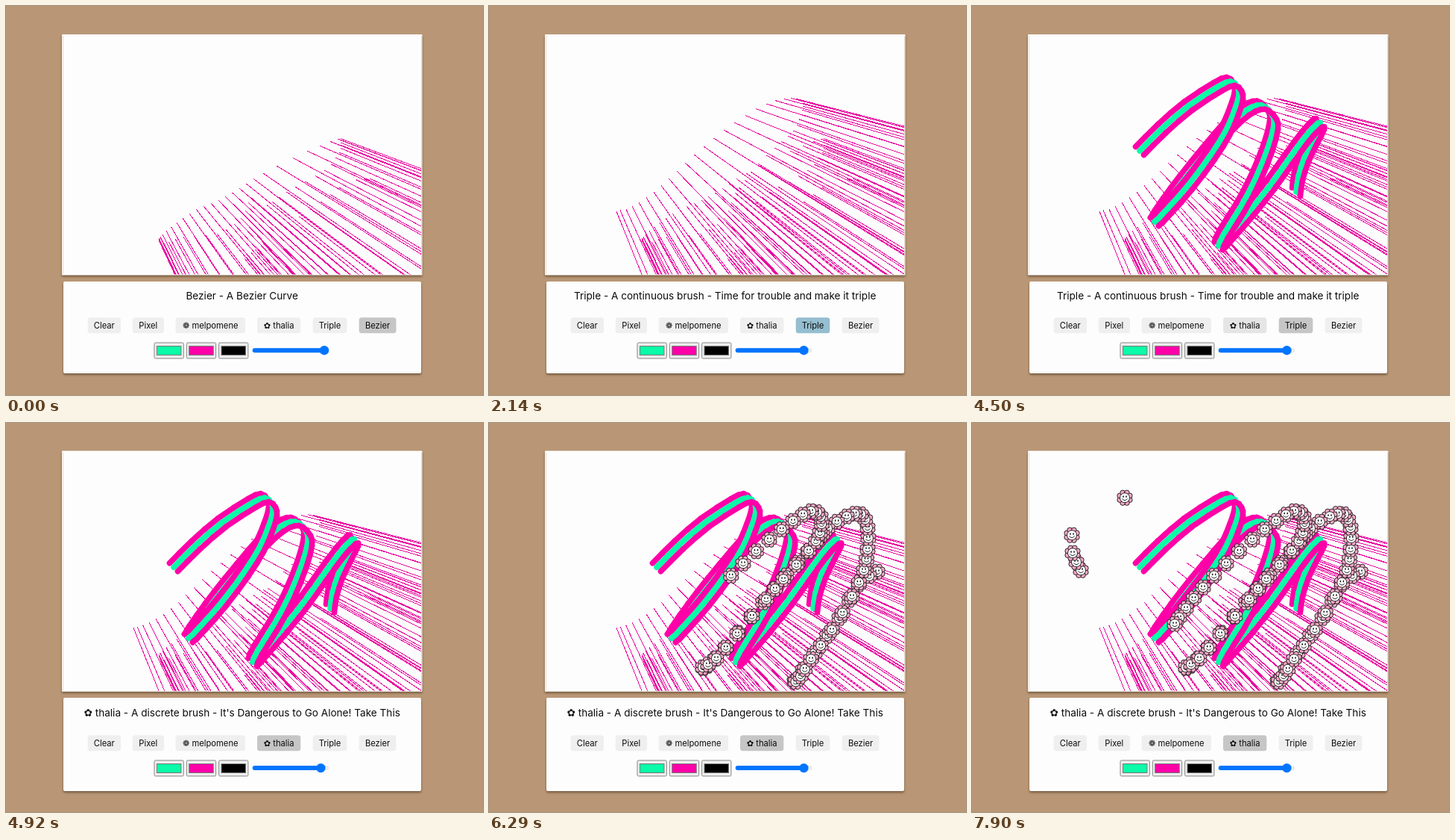
An HTML page for the animation above (8 s loop, 640x521 px).

```html
<!DOCTYPE html>
<html lang="en">
<head>
<meta charset="utf-8">
<title>Brushes</title>
<style>
html, body { margin: 0; width: 100%; height: 100%; overflow: hidden; background: #b99776; }
svg { display: block; width: 640px; height: 521px; }
text { font-family: Inter, "DejaVu Sans", sans-serif; text-anchor: middle; fill: #0b0b0b; }
#title { font-size: 13.6px; }
#buttons text { font-size: 11.2px; }
.card { filter: drop-shadow(0 2px 1.6px rgba(45, 25, 5, .5)); }
</style>
</head>
<body>
<svg id="stage" viewBox="0 0 640 521" xmlns="http://www.w3.org/2000/svg">
  <defs>
    <clipPath id="paper"><rect x="77" y="39" width="480" height="320.5"/></clipPath>
    <g id="flower" stroke="#111" stroke-width=".9">
      <g id="petals" fill="#f7a8c8"></g>
      <circle r="6.5" fill="#fff"/>
      <ellipse cx="-2" cy="-1.6" rx=".8" ry="1.4" fill="#111" stroke="none"/>
      <ellipse cx="2" cy="-1.6" rx=".8" ry="1.4" fill="#111" stroke="none"/>
      <path d="M-3.6 1.2Q0 5.6 3.6 1.2" fill="none"/>
    </g>
  </defs>
  <rect width="640" height="521" fill="#b99776"/>
  <g id="board">
    <rect class="card" x="75" y="38" width="483.5" height="322.5" rx="1" fill="#fff"/>
    <path d="M76.5 40V359M557.5 40V359" stroke="#e6d9cb" stroke-width="1"/>
    <rect x="77" y="39" width="480" height="320.5" fill="#fdfdfd"/>
    <g clip-path="url(#paper)">
      <path id="rays" fill="none" stroke="#e8069f" stroke-width="1" shape-rendering="crispEdges"/>
      <g id="ribbon" stroke-width="7.6" stroke-linecap="round"></g>
      <g id="flowers"></g>
    </g>
  </g>
  <rect id="panel" class="card" x="77" width="480" rx="2" fill="#fdfdfd"/>
  <text id="title" x="316.7" y="393.2"></text>
  <g id="controls">
    <g id="buttons"></g>
    <g id="swatches"></g>
    <rect x="331" y="458.7" width="101.5" height="5" rx="2.5" fill="#efefef" stroke="#d2d2d2" stroke-width=".6"/>
    <rect id="fill" x="330.7" y="458.2" height="6" rx="3" fill="#0075ff"/>
    <circle id="thumb" cy="461.2" r="6.2" fill="#0075ff"/>
  </g>
</svg>
<script>
const LOOP = 8000, STEP = 123.4;
const PINK = "#ff00a8", GREEN = "#0afca8";
const $ = id => document.getElementById(id);

function add(parent, tag, attrs) {
  const el = document.createElementNS("http://www.w3.org/2000/svg", tag);
  for (const key in attrs) el.setAttribute(key, attrs[key]);
  return parent.appendChild(el);
}

// Smooth curve through flat x,y pairs, sampled n times per span.
function trace(flat, n) {
  const pts = [], out = [];
  for (let i = 0; i < flat.length; i += 2) pts.push([flat[i], flat[i + 1]]);
  const at = i => pts[Math.max(0, Math.min(pts.length - 1, i))];
  for (let i = 0; i < pts.length - 1; i++) {
    for (let k = 0; k < n; k++) {
      const u = k / n;
      out.push([0, 1].map(c => {
        const [a, b, d, e] = [-1, 0, 1, 2].map(o => at(i + o)[c]);
        return b + u * ((d - a) + u * ((2 * a - 5 * b + 4 * d - e) + u * (3 * b - a - 3 * d + e))) / 2;
      }));
    }
  }
  out.push(at(pts.length));
  return out;
}

// Piecewise linear value through [time, value] keys.
function tween(t, keys) {
  if (t <= keys[0][0]) return keys[0][1];
  for (let i = 1; i < keys.length; i++) {
    const [t0, v0] = keys[i - 1], [t1, v1] = keys[i];
    if (t < t1) return v0 + (v1 - v0) * (t - t0) / (t1 - t0);
  }
  return keys[keys.length - 1][1];
}

const raysOld = trace([
  488,231, 458,236, 422,262, 380,292, 345,318, 320,338, 335,322, 341,278, 357,262,
  388,242, 427,220, 447,196, 449,183, 445,178, 404,194, 345,224, 313,244, 285,260,
  255,272, 229,290, 210,306, 205,313, 212,318, 238,309, 283,305, 315,284, 328,256], 3);
const raysNew = trace([
  330,250, 351,222, 383,190, 408,167, 418,145, 420,130, 405,123.5, 372,131,
  329,156, 288,188, 252,221, 221,249, 192,268, 171,275], 3);
const ribbonPts = trace([
  435,249, 438,228, 446,203, 458,178, 467,160, 464,157, 448,174, 425,205, 400,240,
  372,275, 345,306, 331,321, 338,305, 360,270, 380,232, 397,190, 405,160, 403,146,
  393,135, 382,133, 366,141, 345,160, 315,195, 285,232, 262,263, 245,289,
  262,272, 290,240, 320,200, 340,168, 352,140, 358,120, 356,108, 347,101,
  330,108, 290,134, 255,164, 225,194], 2);
const flowerPts = trace([
  521,200, 496,217, 470,262, 437,309, 410,347, 418,340, 432,317, 460,278, 487,233,
  503,198, 508,170, 508,141, 499,123, 480,126, 454,142, 440,160, 414,188, 383,223,
  352,260, 317,302, 293,326, 287,328, 305,316, 333,283, 372,237, 395,210, 429,172,
  444,148, 445,126, 432,119, 408,132, 376,157, 341,189, 310,221, 287,249, 272,270], 2);
const sprigPts = [[146, 198], [140, 187], [135, 175], [134, 151], [205, 101]];

// Each ray runs away from the paper's corner.
const ray = ([x, y]) => {
  const dx = x - 76, dy = y - 39, k = 700 / Math.hypot(dx, dy);
  return `M${x.toFixed(1)} ${y.toFixed(1)}L${(x + dx * k).toFixed(1)} ${(y + dy * k).toFixed(1)}`;
};
const oldRays = raysOld.map(ray).join(""), newRays = raysNew.map(ray);

for (let i = 0; i < 8; i++) {
  const a = (i + .5) * Math.PI / 4;
  add($("petals"), "circle", { cx: 7.3 * Math.cos(a), cy: 7.3 * Math.sin(a), r: 3.4 });
}

const ribbon = ribbonPts.slice(1).map(([x, y], i) => {
  const g = add($("ribbon"), "g", {}), [px, py] = ribbonPts[i];
  for (const [o, stroke] of [[-5.5, PINK], [0, GREEN], [5.5, PINK]])
    add(g, "line", { x1: px + o, y1: py + o, x2: x + o, y2: y + o, stroke });
  return g;
});

const plant = ([x, y]) => add($("flowers"), "use", { href: "#flower", x, y });
const flowers = flowerPts.map(plant), sprig = sprigPts.map(plant);

const buttons = {};
for (const [name, label, x, w] of [
  ["clear", "Clear", 109.7, 44.3], ["pixel", "Pixel", 169.7, 42.3],
  ["melpomene", "❁ melpomene", 227.5, 93.5], ["thalia", "✿ thalia", 337, 58.3],
  ["triple", "Triple", 411.7, 45.6], ["bezier", "Bezier", 473.7, 49.8]]) {
  buttons[name] = add($("buttons"), "rect", { x, y: 417.3, width: w, height: 21, rx: 3.5 });
  add($("buttons"), "text", { x: x + w / 2, y: 431.9 }).textContent = label;
}

[GREEN, PINK, "#000"].forEach((fill, i) => {
  const x = 199 + i * 43.3;
  add($("swatches"), "rect", { x, y: 451, width: 39.3, height: 21, rx: 1.5, fill: "#efefef", stroke: "#858585", "stroke-width": 1 });
  add($("swatches"), "rect", { x: x + 3.4, y: 455.6, width: 32.5, height: 12, fill, stroke: "#777", "stroke-width": 1 });
});

const titles = {
  bezier: "Bezier - A Bezier Curve",
  triple: "Triple - A continuous brush - Time for trouble and make it triple",
  thalia: "✿ thalia - A discrete brush - It's Dangerous to Go Alone! Take This"
};

const reveal = (list, n) => list.forEach((el, i) => el.setAttribute("display", i < n ? "inline" : "none"));
const count = v => Math.floor(v + .01);

function draw(time) {
  const t = Math.floor((time + 30) / STEP) * STEP;
  const mode = t < 1970 ? "bezier" : t < 4680 ? "triple" : "thalia";
  const tall = mode === "thalia";

  const rays = count(tween(t, [[0, 0], [520, 15], [1090, newRays.length]]));
  $("rays").setAttribute("d", oldRays + newRays.slice(0, rays).join(""));
  reveal(ribbon, count(tween(t, [[2590, 0], [3325, 50], [3960, ribbon.length]])));
  reveal(flowers, count(tween(t, [[5050, 0], [5550, 18], [6290, 66], [6540, flowers.length]])));
  reveal(sprig, count(tween(t, [[7390, 0], [7890, sprig.length]])));

  for (const name in buttons) {
    let fill = "#efefef";
    if (name === mode) fill = "#c6c6c6";
    if (name === "triple" && t >= 1970 && t < 2200 || name === "thalia" && t >= 4680 && t < 4900) fill = "#95bed0";
    if (name === "thalia" && t >= 4400 && t < 4680) fill = "#e5e5e5";
    buttons[name].setAttribute("fill", fill);
  }
  $("title").textContent = titles[mode];

  const knob = tween(t, [[1150, 427], [1480, 422.4]]);
  $("thumb").setAttribute("cx", knob);
  $("fill").setAttribute("width", knob - 330.7);

  $("board").setAttribute("transform", `translate(0 ${tall ? -.8 : 0})`);
  $("controls").setAttribute("transform", `translate(0 ${tall ? .9 : 0})`);
  $("panel").setAttribute("y", tall ? 368.1 : 369);
  $("panel").setAttribute("height", tall ? 124.8 : 123);
}

const start = performance.now();
function tick() {
  draw((performance.now() - start) % LOOP);
  requestAnimationFrame(tick);
}
tick();
</script>
</body>
</html>
```
